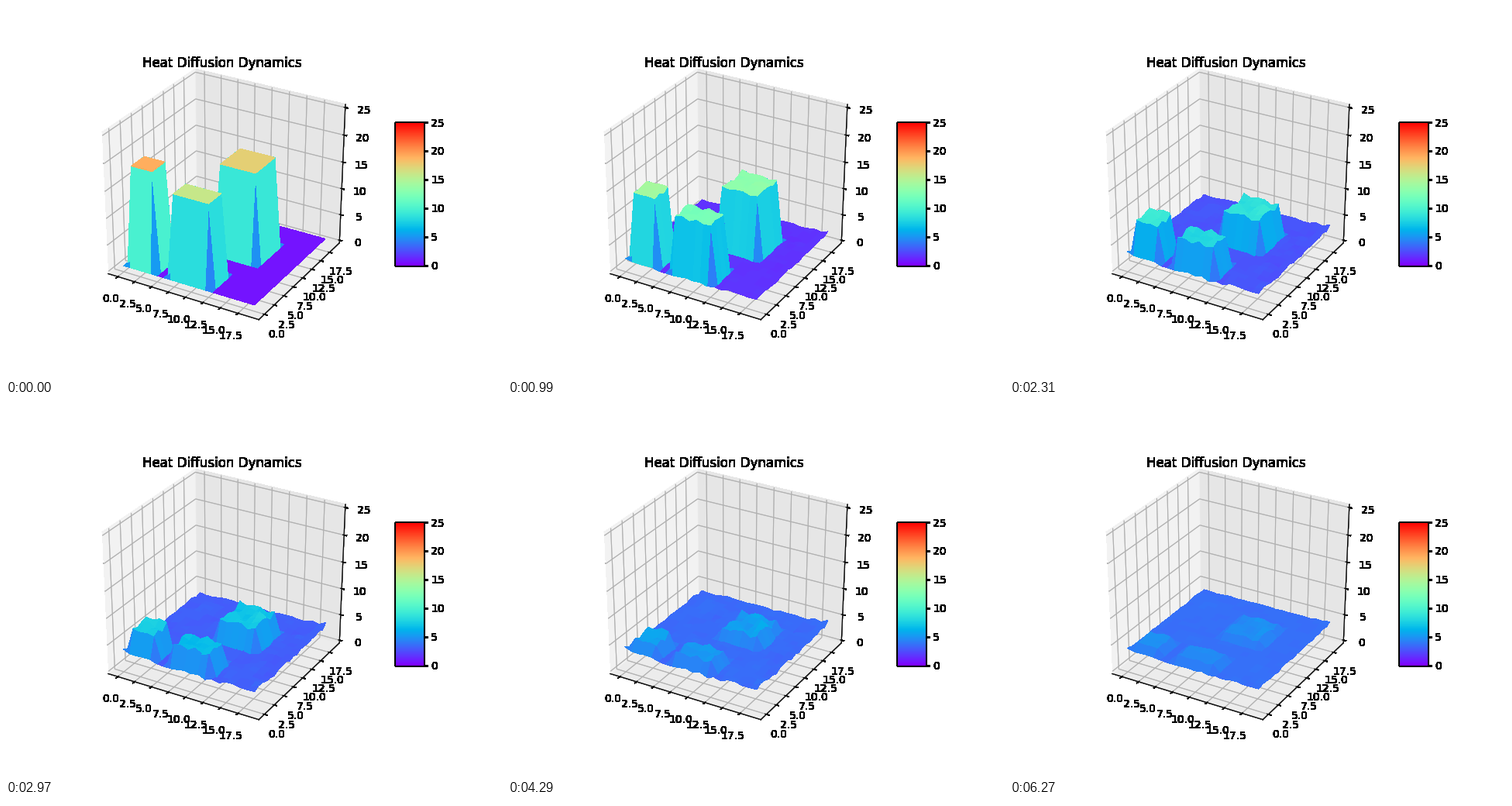
A matplotlib script for the animation above (6600 ms loop, 640 by 480 pixels).

```python
import numpy as np
import matplotlib.pyplot as plt
from matplotlib.animation import FuncAnimation
from mpl_toolkits.mplot3d import Axes3D

FRAMES, INTERVAL = 20, 330
SIZE, PEAK = 20, 25
BALANCE, FLOOR = 3.85, 0.65
# x range, y range and starting heat of each block
BLOCKS = [((1, 5), (1, 5), 19.0), ((7, 13), (1, 5), 16.0), ((9, 15), (9, 15), 17.4)]


class StretchedAxes3D(Axes3D):
    """3D axes that fill their whole rectangle instead of a square."""

    def apply_aspect(self, position=None):
        pass


def harden(img, dpi):
    """Make every touched pixel opaque, which gives crisp, heavy edges."""
    out = np.round(img * 255).astype(np.uint8)
    out[..., 3] = np.where(out[..., 3] > 0, 255, 0)
    return out, 0, 0


def starting_heat():
    heat = np.full((SIZE, SIZE), FLOOR)
    for (x0, x1), (y0, y1), level in BLOCKS:
        heat[y0:y1, x0:x1] = level
    return heat


START = starting_heat()
rng = np.random.default_rng(12)
spread = np.where(START > FLOOR, 0.42, 0.2)
rough_a, rough_b = rng.normal(0, 1, (2, SIZE, SIZE)).clip(-2, 2) * spread
for corner in (0, -1):
    rough_a[corner, corner] = rough_b[corner, corner] = 0.6


def heat_at(n):
    """Heat relaxes to the common mean while a rough pattern drifts."""
    keep = 0.06 + 0.94 * np.exp(-n * (0.11 + 0.008 * n)) if n else 1
    amount = (1 - np.exp(-n / 3)) * (1 - 0.5 * np.clip((n - 13) / 6, 0, 1))
    turn = 0.06 * n
    rough = np.cos(turn) * rough_a + np.sin(turn) * rough_b
    return BALANCE + (START - BALANCE) * keep + amount * rough


fig = plt.figure(figsize=(6.4, 4.8), dpi=100, facecolor="white")
ax = fig.add_subplot(axes_class=StretchedAxes3D)
norm = plt.Normalize(0, PEAK)
bar = fig.colorbar(plt.cm.ScalarMappable(norm, "rainbow"), ax=ax, shrink=0.5, aspect=5)
for part in (ax, bar.ax):
    part.patch.set_visible(False)
    part.set_agg_filter(harden)

ax.set_title("Heat Diffusion Dynamics", y=1.0)
ax.title.set_y(0.92)
ax.view_init(30, -60)
ax.set_box_aspect((1, 1, 1), zoom=np.sqrt(3) / 1.8294640721620434)

grid_x, grid_y = np.meshgrid(np.arange(SIZE), np.arange(SIZE))
surface = None


def draw(n):
    global surface
    if surface is not None:
        surface.remove()
    surface = ax.plot_surface(grid_x, grid_y, heat_at(n), cmap="rainbow", norm=norm,
                              linewidth=0, antialiased=False)
    ax.set_xticks(np.arange(0, 18, 2.5))
    ax.set_yticks(np.arange(0, 18, 2.5))
    ax.set_zticks(np.arange(0, 26, 5))
    side, rise = 20.9 / 48, PEAK / 48
    ax.set_xlim(-0.95 - side, 19.95 + side)
    ax.set_ylim(-0.95 - side, 19.95 + side)
    ax.set_zlim(-rise, PEAK + rise)
    return [surface]


anim = FuncAnimation(fig, draw, frames=FRAMES, interval=INTERVAL,
                     init_func=lambda: draw(0), blit=False, repeat=True)
plt.show()
```
